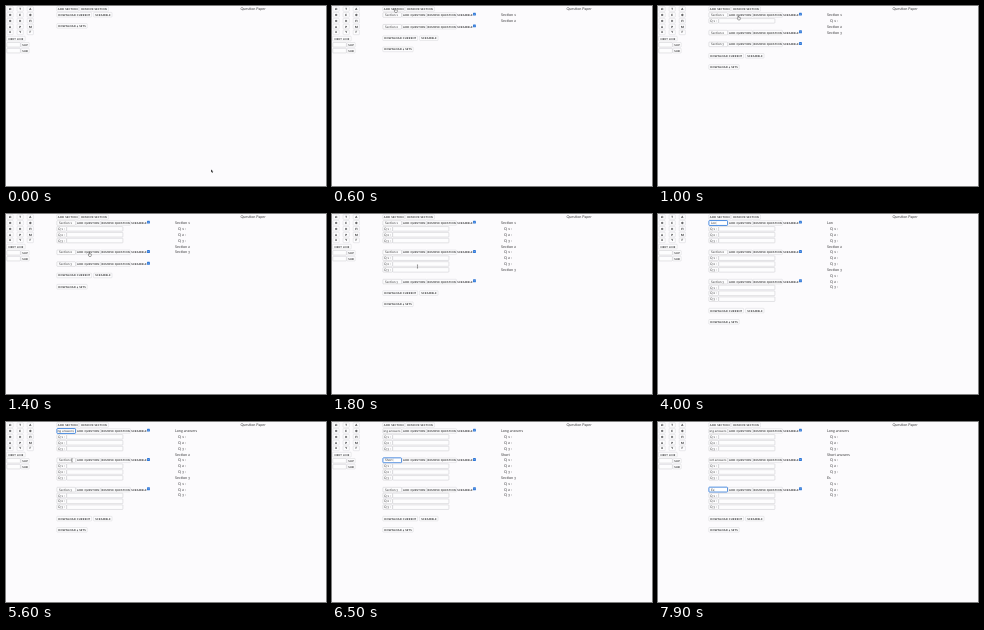
These frames come from a looping animation (320x180 px, 8000 ms). An HTML page:

```html
<!DOCTYPE html>
<html lang="en">
<head>
<meta charset="utf-8">
<title>Question Paper</title>
<style>
  html, body { margin: 0; width: 100%; height: 100%; overflow: hidden; background: #fcfbfd; }
  svg { display: block; }
  #stage { width: 100vw; height: 100vh; }
  text { font-family: Lato, sans-serif; font-variant-numeric: oldstyle-nums; fill: #3a3a3c;
    white-space: pre; text-rendering: geometricPrecision; }
  .btn { font-size: 2.65px; font-weight: 700; letter-spacing: .2px; fill: #2c2c2e; text-anchor: middle; }
  .key { font-size: 2.9px; font-weight: 900; }
  .field { font-size: 3.2px; }
  .paper { font-size: 3.7px; }
  .button { fill: #fdfdfe; stroke: #cdcdd1; stroke-width: .4; }
  .box { fill: #fdfdfe; stroke: #bcbcc0; stroke-width: .4; }
  .focus { fill: #fff; stroke: #3a80dc; stroke-width: .9; }
  .mark { fill: #b5d3f7; }
</style>
</head>
<body>
<svg id="stage" viewBox="0 0 320 180"></svg>
<script>
const LOOP = 8000, STEP = 100, ROW = 5.85, TOP = 9;
const stage = document.getElementById('stage');

const sections = [
  { at: 400, asks: [1000, 1100, 1200], focus: [2900, 5700], select: 2900, name: 'Long answers',
    keys: [4000, 4000, 4000, 4100, 4200, 4400, 4500, 4600, 4700, 4800, 4900, 5000] },
  { at: 600, asks: [1500, 1600, 1800], focus: [5700, 7200], select: 5900, name: 'Short answers',
    keys: [6000, 6000, 6100, 6100, 6200, 6500, 6600, 6600, 6700, 6700, 6800, 6800, 6900] },
  { at: 700, asks: [2100, 2200, 2300], focus: [7200, LOOP], select: 7300, name: 'Essay',
    keys: [7800, 7900] }
];

// time, x, y, shape
const pointer = [
  [0, 205, 163.5, 'arrow'], [100, 93, 24, 'arrow'], [200, 63, 2.5, 'hand'],
  [800, 74, 6, 'arrow'], [900, 80, 10, 'hand'], [1300, 82, 22, 'beam'], [1400, 83, 38.5, 'hand'],
  [1800, 85.5, 52.5, 'beam'], [1900, 85, 62, 'arrow'], [2000, 84, 67.5, 'hand'],
  [2400, 84, 55, 'beam'], [2500, 88, 38, 'hand'], [2600, 86, 20, 'beam'],
  [2700, 78, 14, 'beam'], [2800, 67, 10, 'beam'], [2900, 58, 9, 'beam'], [3000, 52, 9, 'beam'],
  [4000, 0, 0, ''], [5100, 62, 22, 'beam'], [5200, 64, 32, 'arrow'], [5300, 67, 40, 'beam'],
  [5500, 66, 38.3, 'beam'], [5800, 54, 38.3, 'beam'], [5900, 46, 39, 'arrow'], [6000, 0, 0, ''],
  [7000, 62, 50, 'beam'], [7100, 66, 66, 'beam'], [7200, 57, 67.7, 'beam'],
  [7300, 48, 67.7, 'arrow'], [7500, 51, 67.7, 'beam'], [7800, 0, 0, '']
];

const shapes = {
  arrow: '<path d="M0 0v3l.8-.7.6 1.2.6-.3-.6-1.2h1z" fill="#111" stroke="#fff" stroke-width=".2"/>',
  hand: '<path d="M0 0h.7v1.2l1.6.4v1.4l-.5 1h-1.6l-1-1.6.3-.3.5.4z" fill="#fff" stroke="#222" stroke-width=".4"/>',
  beam: '<path d="M-.6-1.6h1.2M0-1.6v3.2M-.6 1.6h1.2" fill="none" stroke="#333" stroke-width=".4"/>'
};

const passed = (times, t) => times.filter(v => v <= t).length;
const rect = (x, y, w, h, cls) => `<rect x="${x}" y="${y}" width="${w}" height="${h}" rx=".6" class="${cls}"/>`;
const text = (x, y, s, cls, more = '') => `<text x="${x}" y="${y}" class="${cls}" ${more}>${s}</text>`;
const box = (x, y, w, cls = 'box', h = 4.6) => rect(x, y - h / 2, w, h, cls);
const button = (x, y, w, s, cls = 'btn') =>
  box(x, y, w, 'button') + text(x + w / 2 + .1, y + .95, s, cls);

function keypad() {
  const rows = ['ΩTΔ', 'ΘEΦ', 'ΘHΠ', 'APM', 'ΛYΓ'];
  let out = '';
  rows.forEach((row, r) => [...row].forEach((c, i) => {
    out += button(1 + i * 10.1, 3 + r * ROW, 6.2, c, 'btn key');
  }));
  out += button(.4, 32.6, 18.8, 'NEXT LINE');
  ['SUP', 'SUB'].forEach((s, i) => {
    const y = 38.8 + i * ROW;
    out += box(.8, y, 13.6) + button(15, y, 8.2, s);
  });
  return out;
}

const fixed = keypad() +
  button(50.8, 3, 21.8, 'ADD SECTION') + button(73.8, 3, 28.6, 'REMOVE SECTION') +
  text(247, 4.1, 'Question Paper', 'paper', 'text-anchor="middle"');

function nameField(sec, label, y, t) {
  const on = t >= sec.focus[0] && t < sec.focus[1];
  const typed = t >= sec.keys[0];
  const marked = on && !typed && t >= sec.select;
  const long = label.length > 9;
  const caret = on && typed ? '<tspan font-weight="300">|</tspan>' : '';
  return box(50.9, y, 18.6, on ? 'focus' : 'box', on ? 4.9 : 4.6) +
    `<svg x="51.5" y="${y - 2.2}" width="17.5" height="4.4">` +
    (marked ? rect(1.3, .4, 14, 3.6, 'mark') : '') +
    text(long ? 16.8 : 1.5, 3.3, label + caret, 'field', long ? 'text-anchor="end"' : '') + '</svg>';
}

function checkbox(y) {
  return text(133, y + .95, 'SCRAMBLE', 'btn') +
    `<rect x="141" y="${y - 2.3}" width="2.9" height="2.9" rx=".5" fill="#2f78d8"/>` +
    `<path d="M141.7 ${y - .9}l.5.5 1-1.1" fill="none" stroke="#fff" stroke-width=".3"/>`;
}

function draw(t) {
  let out = fixed, y = TOP, line = TOP;
  sections.forEach((sec, i) => {
    if (t < sec.at) return;
    const count = passed(sec.keys, t);
    const label = count ? sec.name.slice(0, count) : `Section ${i + 1}`;
    out += nameField(sec, label, y, t) + button(70.2, y, 24.1, 'ADD QUESTION') +
      button(95, y, 29.4, 'REMOVE QUESTION') + checkbox(y) +
      text(169, line + 1.1, label, 'paper');
    line += ROW;
    for (let q = 1; q <= passed(sec.asks, t); q++) {
      y += ROW;
      out += box(50.9, y, 9.6) + text(52, y + 1.1, `Q ${q} :`, 'field') + box(60.7, y, 56.2) +
        text(172, line + 1.1, `Q ${q} :`, 'paper');
      line += ROW;
    }
    y += 11.75;
  });
  y -= .3;
  out += button(50.8, y, 34.8, 'DOWNLOAD CURRENT') + button(87.6, y, 18.4, 'SCRAMBLE') +
    button(50.8, y + 11.2, 30.4, 'DOWNLOAD 4 SETS');

  const [, px, py, shape] = pointer[passed(pointer.map(p => p[0]), t) - 1];
  if (shape) out += `<g transform="translate(${px} ${py})">${shapes[shape]}</g>`;
  stage.innerHTML = out;
}

let last = -1;
function tick() {
  const t = Math.floor(performance.now() % LOOP / STEP) * STEP;
  if (t !== last) draw(last = t);
  requestAnimationFrame(tick);
}
tick();
</script>
</body>
</html>
```
